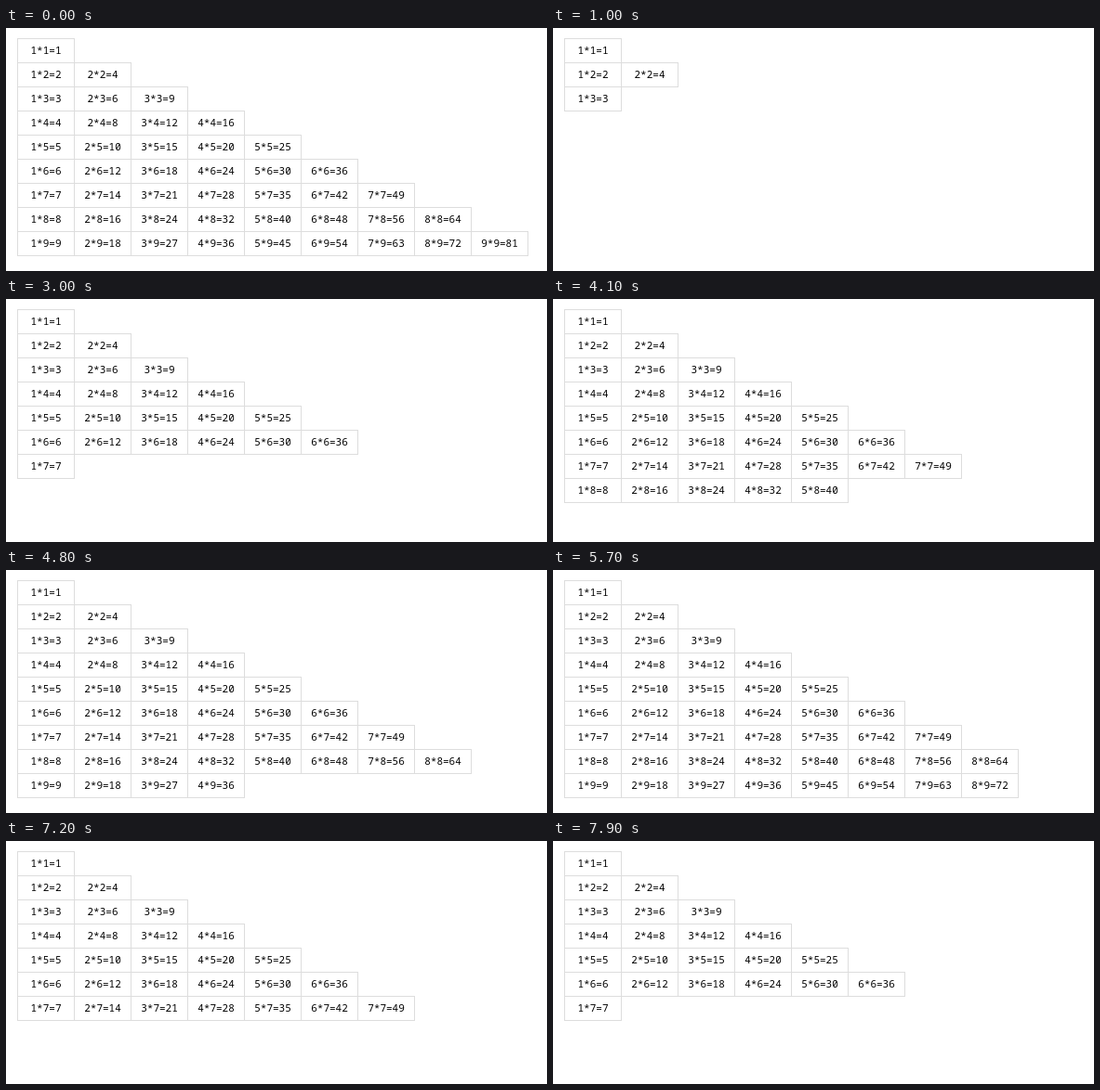
An HTML page that plays this animation: 582 by 262 pixels, repeating every 8 s.

```html
<!DOCTYPE html>
<html lang="en">
<head>
<meta charset="utf-8">
<title>Multiplication table</title>
<style>
  html, body { margin: 0; width: 100%; height: 100%; overflow: hidden; background: #fff; }
  svg { display: block; }
  rect { fill: none; stroke: #ddd; }
  text { font: 11px "Noto Sans Mono", monospace; text-anchor: middle; fill: #000; }
</style>
</head>
<body>
<svg id="table" width="582" height="262"></svg>
<script>
const LOOP = 8000, SIZE = 9;
const table = document.getElementById('table');
const cells = [];

function add(parent, tag, attrs) {
  const el = document.createElementNS('http://www.w3.org/2000/svg', tag);
  for (const key in attrs) el.setAttribute(key, attrs[key]);
  return parent.appendChild(el);
}

// Every row is followed by one idle tick, so a cell's tick is its index plus the rows above it.
let tick = 0;
for (let row = 1; row <= SIZE; row++, tick++) {
  for (let col = 1; col <= row; col++, tick++) {
    const x = 12 + 61 * (col - 1), y = 11 + 26 * (row - 1);
    const el = add(table, 'g', {});
    add(el, 'rect', { x: x + .5, y: y + .5, width: 61, height: 26 });
    add(el, 'text', { x: x + 31, y: y + 17 }).textContent = `${col}*${row}=${col * row}`;
    cells.push({ el, tick });
  }
}
const lastTick = cells[cells.length - 1].tick;

// The table builds up and then unwinds, at 12 ticks per 11 steps of 100 ms.
function progress(ms) {
  const step = Math.floor(ms / 100);
  if (step < 5) return lastTick;
  const now = step - 2 + Math.floor((step - 37) / 11);
  return Math.min(now, 2 * lastTick + 3 - now);
}

function draw() {
  const shown = progress(performance.now() % LOOP);
  for (const { el, tick } of cells) el.style.display = tick <= shown ? '' : 'none';
  requestAnimationFrame(draw);
}
draw();
</script>
</body>
</html>
```
